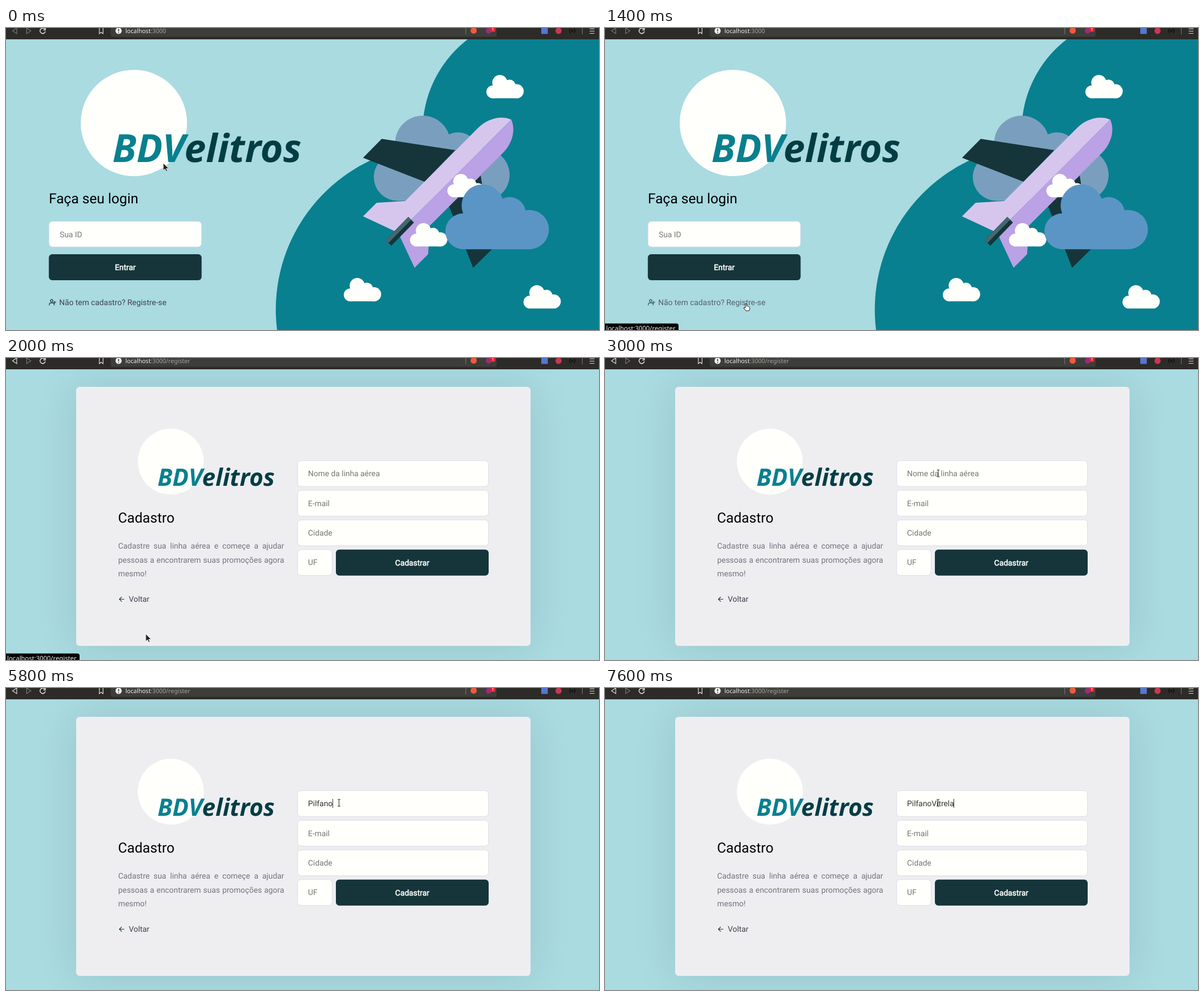
An HTML page that plays this animation: 1048x534 px, repeating every 8 s.

```html
<!DOCTYPE html>
<html lang="pt-BR">
<head>
<meta charset="utf-8">
<title>Cadastro</title>
<style>
html, body { margin: 0; width: 100%; height: 100%; overflow: hidden; background: #a9dbe1; }
body { position: relative; font: 13.87px Roboto, sans-serif; text-rendering: geometricPrecision; }
svg { position: absolute; left: 0; top: 0; }
#card { position: absolute; left: 124px; top: 51px; width: 803px; height: 457.5px; border-radius: 6.2px;
  background: #eeeef1; box-shadow: 0 0 77px rgba(0, 0, 0, .1); }
#intro { position: absolute; left: 198.3px; top: 321px; width: 293.2px; margin: 0; color: #737380;
  line-height: 24.66px; text-align: justify; }
text { white-space: pre; }
.title { font-size: 24.66px; fill: #000; }
.hint { fill: #757575; }
.field { fill: #fffffc; stroke: #dcdce6; }
.button { fill: #15353a; }
.label { fill: #fffffc; stroke: #fffffc; stroke-width: .55; text-anchor: middle; }
.link { fill: #41414d; }
.line { fill: none; stroke: #15353a; stroke-width: 1.2; stroke-linecap: round; stroke-linejoin: round; }
.brand { font: italic 700 68.5px "Noto Sans", "Open Sans", sans-serif; fill: #033d44; }
.bar { font: 10.6px "Noto Sans", sans-serif; fill: #f0f0ee; }
.bar .dim { fill: #a5a5a0; }
.icon { fill: none; stroke: #deded9; stroke-width: 1.2; }
</style>
</head>
<body>
<div id="card"></div>
<p id="intro">Cadastre sua linha aérea e começe a ajudar pessoas a encontrarem suas promoções agora mesmo!</p>

<svg width="1048" height="534" viewBox="0 0 1048 534">
  <defs>
    <g id="cloud">
      <circle cx="52" cy="136" r="52"/><circle cx="108" cy="61" r="61"/>
      <circle cx="186" cy="84" r="47"/><circle cx="243" cy="131" r="57"/>
      <path d="M52 90H243V188H52Z"/>
    </g>
    <path id="wing" d="M664 196L794 216L740 272L631 229.5Z" fill="#15353a"/>
    <path id="hull" d="M893 162C873 153 849 162 835 176L705.5 306L655 309L631 333L693 362Z"/>
    <g id="logo">
      <circle cx="150" cy="94" r="94" fill="#fffffc"/>
      <text class="brand" x="112" y="163"><tspan fill="#08808f">BDV</tspan>elitros</text>
    </g>
  </defs>

  <g id="login">
    <path fill="#08808f" d="M1048 20H816A205 205 0 0 0 738 155V205L690 217A292 292 0 0 0 479 534H1048Z"/>
    <use href="#cloud" transform="translate(650 155) scale(.8)" fill="#7a9fbe"/>
    <use href="#wing"/>
    <use href="#wing" transform="matrix(0 -1 -1 0 1055 1055)"/>
    <use href="#hull" fill="#d6c6ee"/>
    <use href="#hull" fill="#bba1e5" transform="matrix(0 -1 -1 0 1055 1055)"/>
    <path fill="#15353a" d="M711 334L721 344L681 385L671 375Z"/>
    <path fill="#456870" d="M711 334L716 339L676 380L671 375Z"/>
    <g id="puffs" fill="#fffffc"></g>
    <use href="#cloud" transform="translate(776.5 276.5) scale(.61)" fill="#5b95c6"/>

    <use href="#logo" x="76" y="74"/>
    <text class="title" x="75.7" y="310">Faça seu login</text>
    <rect class="field" x="76" y="342" width="269.5" height="45" rx="6"/>
    <text class="hint" x="95" y="370">Sua ID</text>
    <rect id="enter" class="button" x="75.7" y="400" width="270" height="46" rx="6"/>
    <text class="label" x="210.8" y="427.5">Entrar</text>
    <g id="signup">
      <path class="line" d="M76.5 490V488.7A2.6 2.6 0 0 1 79 486.2H82.4A2.6 2.6 0 0 1 85 488.7V490M86 483V487M84 485H88"/>
      <circle class="line" cx="80.7" cy="482.2" r="2.1"/>
      <text class="link" x="94" y="490">Não tem cadastro? Registre-se</text>
    </g>
  </g>

  <g id="register">
    <use id="smallLogo" href="#logo" transform="translate(198.3 125) scale(.62)"/>
    <g id="aside">
      <text class="title" x="198" y="290.5">Cadastro</text>
      <path class="line" d="M208.5 426.5H200.5M204.3 422.6L200.4 426.5L204.3 430.4"/>
      <text class="link" x="217" y="431.3">Voltar</text>
    </g>
    <g id="fields"></g>
    <rect class="button" x="583" y="338.7" width="270" height="46" rx="6"/>
    <text class="label" x="718" y="366.5">Cadastrar</text>
    <text id="typed" x="533.8" y="209" fill="#333"></text>
    <rect id="caret" y="196" width="1" height="16" fill="#333"/>
  </g>

  <g id="toolbar">
    <rect width="1048" height="20" fill="#2c2b28"/>
    <path fill="#3d3d3a" d="M185 0H867V12Q867 15.5 863 15.5H189Q185 15.5 185 12Z"/>
    <path id="back" class="icon" d="M19 0V10L11.5 5Z"/>
    <path class="icon" style="stroke:#777772" d="M36.5 0V10L44 5Z"/>
    <path class="icon" style="stroke-width:1.5" d="M68.5 2A4.7 4.7 0 1 0 69.5 6M69.5 0V3.5H66"/>
    <path class="icon" d="M165 -1V10L168.3 7.5L171.5 10V-1"/>
    <circle cx="199" cy="5" r="5.5" fill="#f0f0ee"/>
    <path d="M199 1.5V5.7M199 7.2V8.7" stroke="#333" stroke-width="1.5"/>
    <text class="bar" x="211" y="8.5">localhost<tspan class="dim">:3000<tspan id="path">/register</tspan></tspan></text>
    <path d="M812.5 0V11M1018.5 0V11" stroke="#777772"/>
    <circle cx="826.5" cy="4.5" r="5.5" fill="#f05a3a"/>
    <circle cx="853" cy="5" r="5" fill="#9b2c78"/>
    <rect x="856" y="-4" width="9" height="11" rx="2" fill="#e0252d"/>
    <text x="860.5" y="5" font-size="8" text-anchor="middle" fill="#fff">1</text>
    <rect x="946" y="-1" width="11.5" height="11.5" fill="#5677cf"/>
    <circle cx="976.5" cy="5" r="5.5" fill="#c83852"/>
    <g fill="none" stroke="#0e0e0d" stroke-width="1.3">
      <circle cx="1001" cy="5" r="1.2"/>
      <path d="M998 1Q994.5 5 998 9M1004 1Q1007.5 5 1004 9"/>
    </g>
    <path class="icon" d="M1031.5 1.5H1040M1031.5 5.5H1040M1031.5 9.5H1040"/>
  </g>

  <g id="status">
    <path d="M0 522.5H126Q130 522.5 130 526V534H0Z"/>
    <text class="bar" style="font-size:11.37px" x="2" y="535">localhost:3000/register</text>
  </g>

  <g id="pointer">
    <path id="arrow" d="M0 0V13L3 10.2L5.2 14.5L7.3 13.5L5.2 9.5H9.5Z" fill="#222" stroke="#f4f4f4" stroke-width=".8"/>
    <path id="hand" d="M-1 8V1Q0 -1 1.2 1V5Q2.5 4 3.3 5.5Q4.8 4.7 5.3 6Q6.8 5.5 6.8 7.5V10L5.5 13H0L-4 8Q-3.5 6 -1 8Z" fill="#fff" stroke="#222"/>
    <path id="beam" d="M-2.5 -6H-.7L0 -5.3L.7 -6H2.5M0 -5.3V5.3M-2.5 6H-.7L0 5.3L.7 6H2.5" fill="none" stroke="#333" stroke-width="1.1"/>
  </g>
</svg>

<script>
const LOOP = 8000;
const $ = id => document.getElementById(id);
const show = (id, on) => { $(id).style.display = on ? "" : "none"; };
const within = (t, from, to) => t >= from && t < to;

// Each step: start time, then its value(s), held until the next one.
const pointerSteps = [
  [0, 278, 239, "arrow"], [300, 276, 258, "arrow"], [400, 273, 282, "arrow"],
  [600, 269, 315, "arrow"], [700, 264, 365, "beam"], [800, 258, 405, "hand"],
  [900, 253, 438, "hand"], [1000, 249, 475, "arrow"], [1200, 249, 482, "hand"],
  [1300, 249, 487, "hand"], [1900, 247, 488, "arrow"], [2300, 285, 480, "arrow"],
  [2400, 357, 449, "arrow"], [2600, 541, 279, "arrow"], [2800, 565, 246, "beam"],
  [2900, 583, 217, "beam"], [3000, 589, 204, "beam"], [3100, 588.5, 203, "beam"]
];
const NAME = "PilfanoVitrela";
const typingSteps = [
  [0, 0], [4500, 1], [5100, 2], [5200, 3], [5400, 4], [5600, 5], [5800, 7],
  [6600, 8], [6800, 9], [7000, 10], [7100, 11], [7200, 12], [7500, 13], [7600, 14]
];
const stepAt = (steps, t) => steps.findLast(step => step[0] <= t);

$("puffs").innerHTML = [[849, 83], [597, 442], [914.5, 454.7], [714, 345], [780, 258]]
  .map(([x, y]) => `<use href="#cloud" transform="translate(${x} ${y}) scale(.22)"/>`).join("");

$("fields").innerHTML = ["Nome da linha aérea", "E-mail", "Cidade", "UF"].map((label, i) => {
  const y = 181.5 + i * 52.4;
  return `<rect class="field" x="515.3" y="${y}" width="${i < 3 ? 337.3 : 61}" height="45.7" rx="6"/>
    <text class="hint" x="533.8" y="${y + 27.6}">${label}</text>`;
}).join("");
const nameHint = $("fields").querySelector("text");

function drawPages(t) {
  const registering = t >= 1900;
  const loaded = t >= 2000;
  const shift = loaded ? 0 : -53;
  show("login", !registering);
  for (const id of ["register", "card", "intro", "path"]) show(id, registering);
  show("smallLogo", loaded);
  $("card").style.top = (loaded ? 51 : 101) + "px";
  $("card").style.height = (loaded ? 457.5 : 358) + "px";
  $("intro").style.transform = `translateY(${shift}px)`;
  $("aside").setAttribute("transform", `translate(0 ${shift})`);
  $("back").style.stroke = registering ? "" : "#777772";
  $("enter").style.filter = within(t, 800, 1200) ? "brightness(.9)" : "";
  $("signup").style.opacity = within(t, 1200, 1900) ? .8 : 1;
  show("status", within(t, 1300, 2200));
}

function drawTyping(t) {
  const typed = $("typed");
  const text = NAME.slice(0, stepAt(typingSteps, t)[1]);
  if (typed.textContent !== text) typed.textContent = text;
  nameHint.style.display = text ? "none" : "";
  const caretOn = within(t, 3200, 3700) || within(t, 4600, 6400) || t >= 6600;
  show("caret", caretOn);
  if (caretOn) $("caret").setAttribute("x", Math.floor(534 + (text ? typed.getComputedTextLength() : 0)));
}

function drawPointer(t) {
  const [, x, y, shape] = stepAt(pointerSteps, t);
  $("pointer").setAttribute("transform", `translate(${x} ${y})`);
  for (const id of ["arrow", "hand", "beam"]) show(id, id === shape);
}

function frame() {
  const t = performance.now() % LOOP;
  drawPages(t);
  drawTyping(t);
  drawPointer(t);
  requestAnimationFrame(frame);
}
frame();
</script>
</body>
</html>
```
